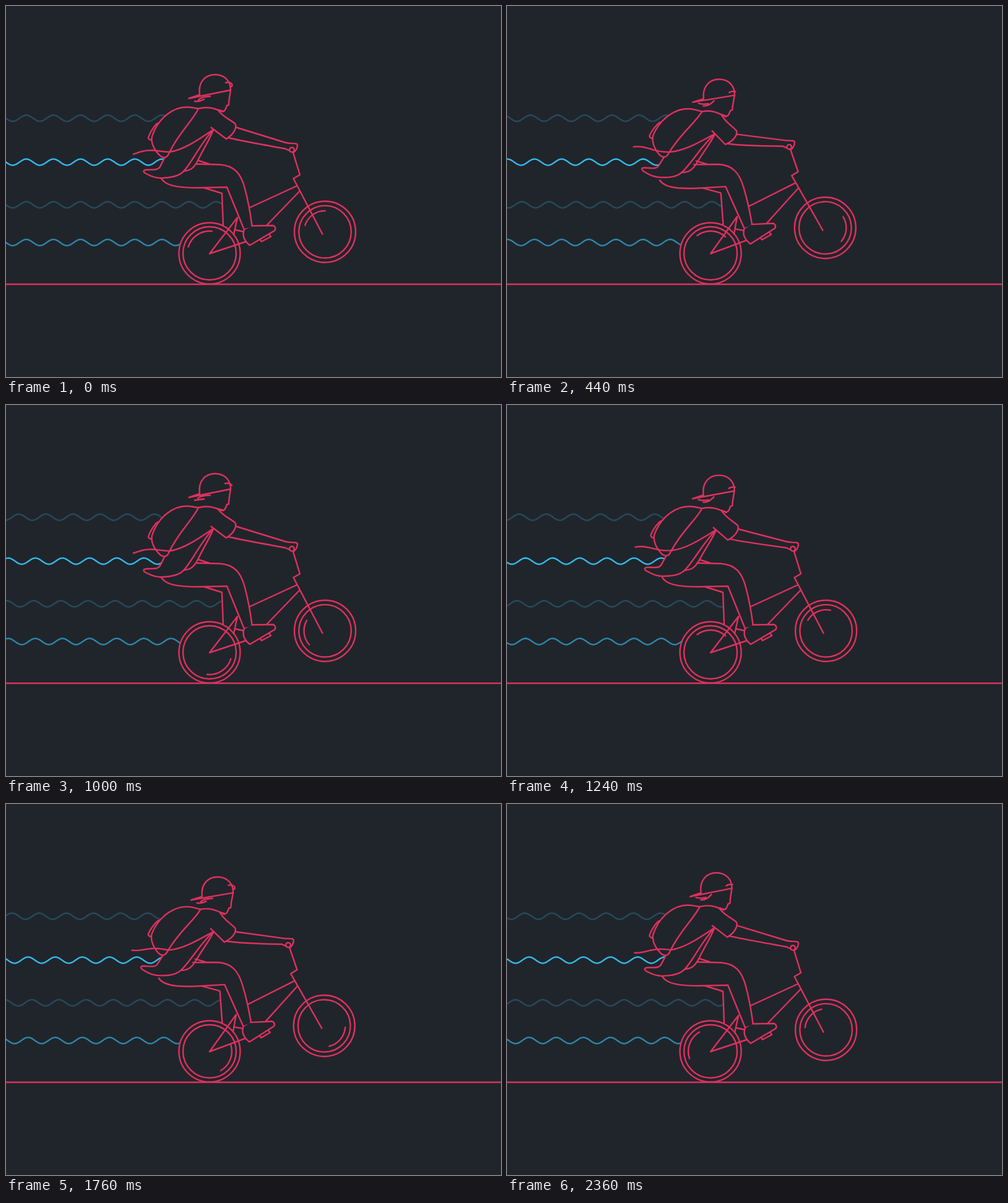
These frames come from a looping animation (800x600 px, 2400 ms). An HTML page:

```html
<!DOCTYPE html>
<html lang="en">
<head>
<meta charset="utf-8">
<title>Wheelie</title>
<style>
  html, body { margin: 0; width: 100%; height: 100%; overflow: hidden; background: #20252b; }
  svg { display: block; width: 100%; height: 100%; }
  svg * { stroke-width: 2.4; stroke-linecap: round; stroke-linejoin: round; }
  #waves { fill: none; stroke: #35baeb; }
  #scene { fill: none; stroke: #df315e; }
  .solid { fill: #20252b; }
</style>
</head>
<body>
<svg viewBox="0 0 800 600">
  <g id="waves"></g>
  <g id="scene">
    <path d="M-5 450H805"/>
    <g class="solid">
      <circle cx="329" cy="400" r="49.5"/>
      <circle cx="329" cy="400" r="43"/>
      <path id="rearShine" d="M294.6 389.5A36 36 0 0 1 332.8 364.2"/>
    </g>
    <g id="bike">
      <path class="solid" stroke="none" d="M349 303L351 355L383 362L357 293Z"/>
      <circle cx="515.6" cy="365.2" r="49.5"/>
      <circle cx="515.6" cy="365.2" r="42.3"/>
      <path id="frontShine" d="M483.3 354.5A34 34 0 0 1 515.6 331.2"/>
      <path d="M320 294L349 303L351 355M329 400.5L374 342L368 370M329 400.5L388 381M370 362L384 365
               M394 326L470 291M421 355L475 299M464 237L475 273L464.500 279L511.500 369"/>
      <path d="M410 377L413 381L428 373L425 369"/>
      <path class="solid" d="M251 279C258 290 275 294 310 294L357 293L385 362C389 360 397 360 397.500 355
               C395 336 390 310 386 295C380 272 370 258 345 256.500L307 255.500"/>
      <path d="M311 250L328 255.500"/>
      <path class="solid" d="M397.500 355.500L432 355Q437 358 434.500 363L394 387C384 379 382 371 384.500 363"/>
      <path id="arm"/>
      <circle cx="462" cy="232.500" r="3.800"/>
    </g>
    <g id="torso">
      <path class="solid" d="M256 246L250 258C246 267 238 264 226 265C221 266 222 269 226 271C238 277 245 279 255 278
               C275 277 284 272 290 264C305 245 315 222 335 200"/>
      <path d="M335 200C330 215 322 225 310 250C304 262 298 266 288 267"/>
      <path class="solid" d="M252 190Q246 187 242 192Q233 203 230 213Q230 216 236 217"/>
      <path class="solid" d="M311 166C301 187 280 203 263 239C260 246 255 246 250 243C238 232 234 220 236 211
               C245 183 270 160 299 164L311 166C325 162 336 165 350 171"/>
      <path d="M265 236C290 232 315 213 335 200"/>
      <path id="cord"/>
      <path id="sleeve" d="M343 169C352 180 361 183 370 190Q373 194 370 200Q367 208 356 215L331.500 196.500"/>
      <g id="head">
        <path d="M313 143.500C310 122 323 111 338 111C354 111 363 122 363 136L295.500 149.500L313 143.500
                 M363 136L360.500 152L360 160L357 161C354.500 168 353 171 350 170L343 168"/>
        <path id="hair"/>
      </g>
    </g>
  </g>
</svg>
<script>
const FRAME = 40, LOOP = 2400, WAVELENGTH = 43.85;
const TAU = 2 * Math.PI;
const el = id => document.getElementById(id);
const turn = (id, ...args) => el(id).setAttribute('transform', `rotate(${args})`);

// centre line, opacity, pixels moved left per frame
const waves = [
  [181.5, .26, 7.5],
  [252.5, 1, WAVELENGTH / 15],
  [321.5, .26, 4.78],
  [382.5, .66, WAVELENGTH / 15],
].map(([y, opacity, speed]) => {
  const path = document.createElementNS('http://www.w3.org/2000/svg', 'path');
  path.setAttribute('opacity', opacity);
  el('waves').append(path);
  return { path, y, speed };
});
const waveEnds = [290, 265, 360, 300];

// hair under the cap plus the strap across the forehead
const hairPoses = [
  'M305 154Q313 155 320 151M311 152Q315 147 330 146M355 124C362 122 366 126 365.5 129q-1 2 -3 1',
  'M305 154Q313 153 320 152M310 151Q315 146 330 146M354 127Q361 125 365 130',
  'M304 154Q312 150 320 153M309 150Q315 146 330 147M353 129Q358 132 365 131',
  'M305 151Q312 153 321 151M313 155C322 155 326 150 330 146M354 132Q357 129 364 130',
];

const ease = (t, from, to) => {
  const p = Math.min(1, Math.max(0, (t - from) / (to - from)));
  return (1 - Math.cos(Math.PI * p)) / 2;
};

function rotate([x, y], degrees, cx, cy) {
  const a = degrees * TAU / 360, c = Math.cos(a), s = Math.sin(a);
  return [cx + (x - cx) * c - (y - cy) * s, cy + (x - cx) * s + (y - cy) * c];
}

function curve(x0, x1, step, f) {
  const points = [];
  for (let x = x0; x <= x1; x += step) points.push(x.toFixed(1) + ' ' + f(x).toFixed(2));
  return 'M' + points.join('L');
}

function draw(now) {
  const frame = Math.floor(now % LOOP / FRAME), t = frame * FRAME;

  waves.forEach(({ path, y, speed }, i) => path.setAttribute('d', curve(-4, waveEnds[i], 2,
    x => y - 5 * Math.cos(TAU * (x - 32.8 + speed * frame) / WAVELENGTH))));

  turn('rearShine', 36 * frame, 329, 400);
  turn('frontShine', 12 * frame, 515.6, 365.2);

  const beat = t % (4000 / 3);
  const lift = ease(beat, 340, 430) - ease(beat, 560, 820);
  const bob = (1 - Math.cos(TAU * t * 3 / 1000)) / 2;
  const tilt = -2 * lift;
  const lean = 4.1 * bob + 2.3 * lift;

  turn('bike', tilt, 329, 400);
  el('torso').setAttribute('transform', `rotate(${tilt} 329 400) rotate(${lean - tilt} 283 265)`);
  turn('head', -.65 * lean, 345, 168);
  turn('sleeve', .6 * lean, 342, 170);

  const cuff = p => rotate(rotate(p, .6 * lean, 342, 170), lean - tilt, 283, 265);
  const low = cuff([359, 213]);
  el('arm').setAttribute('d', `M${cuff([371, 196])}L452 221C460 223 471 221 471 225C471 231 467 236 464 237
    M${low}Q${low[0] + 16} ${low[1] + 4} 452 231L458 234`);

  el('cord').setAttribute('d', curve(206, 265, 2.95, x => {
    const u = (265 - x) / 59;
    return 236 + 5.5 * u * Math.sin(TAU * (.11 + .6 * (1 - u) * -1 - t / 200));
  }));
  el('hair').setAttribute('d', hairPoses[frame % 4]);

  requestAnimationFrame(() => draw(performance.now()));
}
draw(0);
</script>
</body>
</html>
```
